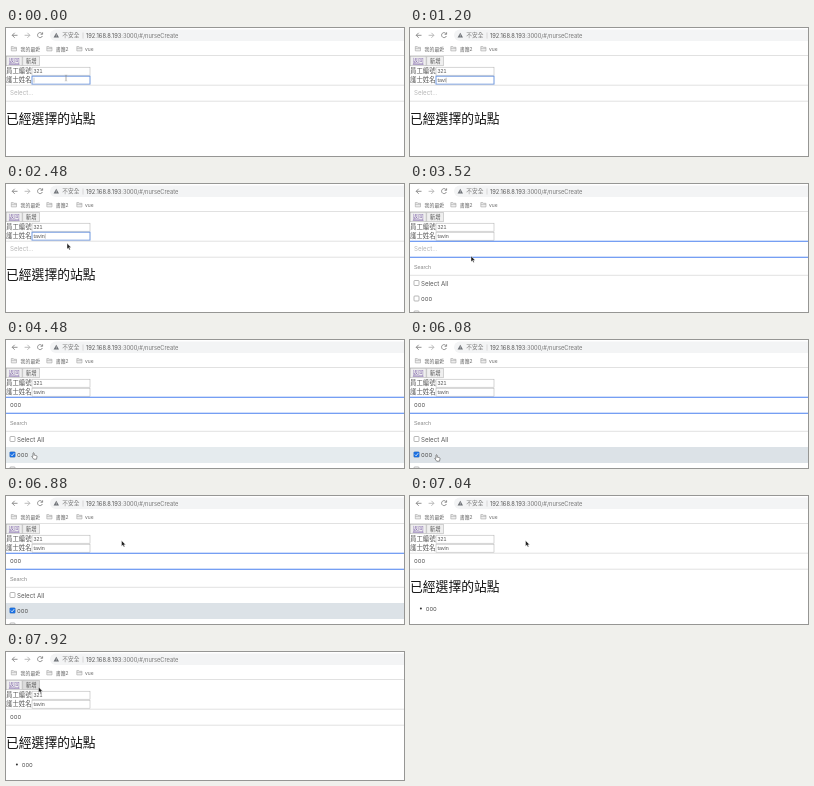
Write an HTML page that moves like this. It is 398 px wide and 128 px high and loops after 8 s.

```html
<!DOCTYPE html>
<html lang="zh-Hant">
<head>
<meta charset="utf-8">
<style>
  html, body { margin: 0; width: 100%; height: 100%; overflow: hidden; background: #fff }
  svg { display: block; width: 398px; height: 128px }
  text { font: 6.2px Inter, 'Noto Sans CJK TC', 'Noto Sans CJK', sans-serif; fill: #555 }
  .cjk { font: 6.4px 'Noto Sans CJK TC', 'Noto Sans CJK', sans-serif }
  .ui { font: 5.33px 'Liberation Sans', 'Noto Sans CJK TC', 'Noto Sans CJK', sans-serif }
  .mark { font-size: 4.9px; fill: #666 }
  .soft { fill: #b4b4b4 }
  .box { fill: #fff; stroke: #aaa; stroke-width: .5 }
  .line { stroke: #d4d4d4; stroke-width: .7 }
  .icon { fill: none; stroke: #777; stroke-width: .8 }
</style>
</head>
<body>
<svg viewBox="0 0 398 128">
  <defs>
    <path id="folder" d="M.3.5h2l.7.8H5.5V4.9H.3zM.3 2.3H5.5" fill="#eee" stroke="#999" stroke-width=".5"/>
    <rect id="check" width="5" height="5" rx=".8" fill="#fff" stroke="#888" stroke-width=".6"/>
  </defs>

  <rect x="44" y="1.5" width="380" height="11.5" rx="5.7" fill="#f3f4f5"/>
  <path class="icon" d="M11.5 7.3H6.2M8.7 4.8 6.2 7.3l2.5 2.5"/>
  <path class="icon" d="M18.6 7.3h5.3M21.4 4.8l2.5 2.5-2.5 2.5" style="stroke:#aaa"/>
  <path class="icon" d="M36.2 5.8A2.5 2.5 0 1 0 36.4 8M36.6 4.3v2h-2"/>
  <path d="M50.3 4.8 53 9.5H47.6z" fill="#6b6f74"/>
  <path d="M50.3 6.4v1.5m0 .4v.6" stroke="#fff" stroke-width=".5"/>
  <text class="cjk" x="56.3" y="9.4" style="font-size:5.7px;fill:#777">不安全</text>
  <path d="M77 4.5v6" stroke="#bbb" stroke-width=".5"/>
  <text x="80" y="9.5" style="font-size:5.73px">192.168.8.193<tspan fill="#777">:3000/#/nurseCreate</tspan></text>
  <use href="#folder" x="5" y="18"/><text class="mark" x="14.6" y="22.8">我的最愛</text>
  <use href="#folder" x="40.5" y="18"/><text class="mark" x="49.8" y="22.8">書籍2</text>
  <use href="#folder" x="70.5" y="18"/><text class="mark" x="79" y="22.8">vue</text>
  <path class="line" d="M0 27.5H398"/>

  <rect class="box" x=".3" y="28.5" width="15.8" height="9.3" style="fill:#efefef"/>
  <text class="ui" x="2.8" y="35.2" style="fill:#7d62a8;text-decoration:underline;text-decoration-thickness:.4px">返回</text>
  <rect class="box" id="add" x="16.8" y="28.5" width="16.6" height="9.3"/>
  <text class="ui" x="19.8" y="35.2">新增</text>

  <text class="cjk" x="0" y="45.4">員工編號</text>
  <rect class="box" x="26" y="39.2" width="58" height="8"/>
  <text class="ui" x="27.5" y="45">321</text>
  <text class="cjk" x="0" y="54.3">護士姓名</text>
  <rect class="box" id="field" x="26" y="48.2" width="58" height="8"/>
  <text class="ui" id="name" x="27.5" y="54"></text>
  <path id="caret" d="M0 49.7v5" stroke="#777" stroke-width=".4"/>

  <path class="line" id="select" d="M0 57.2H398M0 73.2H398"/>
  <text id="value" x="4" y="67.3"></text>

  <g id="result">
    <text class="cjk" x="0" y="94.7" style="font-size:12.8px;font-weight:500;fill:#111">已經選擇的站點</text>
    <g id="item"><circle cx="10.9" cy="112.4" r="1" fill="#333"/><text x="15.7" y="114.5">ooo</text></g>
  </g>

  <g id="menu">
    <text class="ui" x="4" y="85" style="fill:#888">Search</text>
    <path class="line" d="M0 91.3H398"/>
    <use href="#check" x="4" y="96.5"/><text x="11" y="101.6">Select All</text>
    <rect id="row" y="107" width="398" height="16"/>
    <use href="#check" x="4" y="112"/>
    <g id="tick">
      <rect x="3.7" y="111.7" width="5.6" height="5.6" rx=".9" fill="#1a6fe0"/>
      <path d="M4.9 114.6l1.2 1.2 2.1-2.6" fill="none" stroke="#fff" stroke-width=".8"/>
    </g>
    <text x="11" y="117">ooo</text>
    <use href="#check" x="4" y="127"/>
  </g>

  <g id="pointer" stroke-linejoin="round">
    <path id="arrow" d="M0 0v5.8l1.4-1.2.9 2 1-.4-.9-2h1.8z" fill="#222" stroke="#fff" stroke-width=".4"/>
    <path id="beam" d="M-1.2-3q1.2 0 1.2.8v4.4q0 .8-1.2.8M1.2-3q-1.2 0-1.2.8v4.4q0 .8 1.2.8" fill="none" stroke="#888" stroke-width=".4"/>
    <path id="hand" d="M0 0q.7-.7 1.1.1v2l2.3.5q.8.2.6 1.2l-.5 2.4H.7L-1.2 3.5q.1-.9 1.2-.1z" fill="#fff" stroke="#333" stroke-width=".5"/>
  </g>
</svg>
<script>
const LOOP = 8000, OPEN = 2800, PICK = 4400, CLOSE = 6960;
const NAME = 'tavin', TYPE_FROM = 480, TYPE_STEP = 240;
// time, x, y of the pointer
const route = [
  [0, 60, 50], [1840, 60, 50], [2320, 61, 59.3], [2720, 61, 59.3], [3280, 61, 72], [3680, 61, 72],
  [4320, 27, 113], [4640, 27, 113], [5360, 26, 115], [6160, 26, 115], [6720, 115.5, 44.5],
  [7120, 115.5, 44.5], [7760, 32.5, 35], [LOOP, 32.5, 35]
];
const el = {};
document.querySelectorAll('[id]').forEach(e => el[e.id] = e);
const show = (e, on) => e.style.display = on ? '' : 'none';
const clamp = v => Math.max(0, Math.min(1, v));
const mix = (a, b, k) => a + (b - a) * k;

function pointerAt(t) {
  const i = route.findIndex(p => p[0] > t);
  const [t0, x0, y0] = route[i - 1], [t1, x1, y1] = route[i];
  const k = (t - t0) / (t1 - t0), s = k * k * (3 - 2 * k);
  return [mix(x0, x1, s), mix(y0, y1, s)];
}

function draw(t) {
  const [x, y] = pointerAt(t);
  const open = t >= OPEN && t < CLOSE, picked = t >= PICK;
  const focused = t < OPEN;

  const typed = Math.max(0, Math.min(NAME.length, Math.floor((t - TYPE_FROM) / TYPE_STEP) + 1));
  el.name.textContent = NAME.slice(0, typed);
  el.field.style.stroke = focused ? '#6f97de' : '';
  el.field.style.strokeWidth = focused ? 1 : '';
  el.caret.setAttribute('transform', `translate(${28 + (typed ? el.name.getComputedTextLength() : 0)})`);
  show(el.caret, focused && t % 1000 < 500);

  el.select.style.stroke = open ? '#4a80f0' : '';
  el.select.style.strokeWidth = open ? 1.1 : '';
  el.value.textContent = picked ? 'ooo' : 'Select...';
  el.value.setAttribute('class', picked ? '' : 'soft');

  show(el.menu, open);
  show(el.result, !open);
  show(el.item, picked);
  show(el.tick, picked);
  const shade = clamp((t - PICK) / 900);
  el.row.style.fill = picked
    ? `rgb(${mix(230, 220, shade)},${mix(236, 226, shade)},${mix(239, 231, shade)})`
    : y > 107 ? '#f1f3f5' : '#fff';
  el.add.style.fill = x < 34 && y < 38 ? '#dcdcdc' : '#efefef';

  const beam = t < 2100, hand = open && y > 92;
  el.pointer.setAttribute('transform', `translate(${x} ${y})`);
  show(el.pointer, t < TYPE_FROM || t > 1760);
  show(el.beam, beam);
  show(el.hand, hand);
  show(el.arrow, !beam && !hand);
}

(function frame() {
  draw(performance.now() % LOOP);
  requestAnimationFrame(frame);
})();
</script>
</body>
</html>
```
